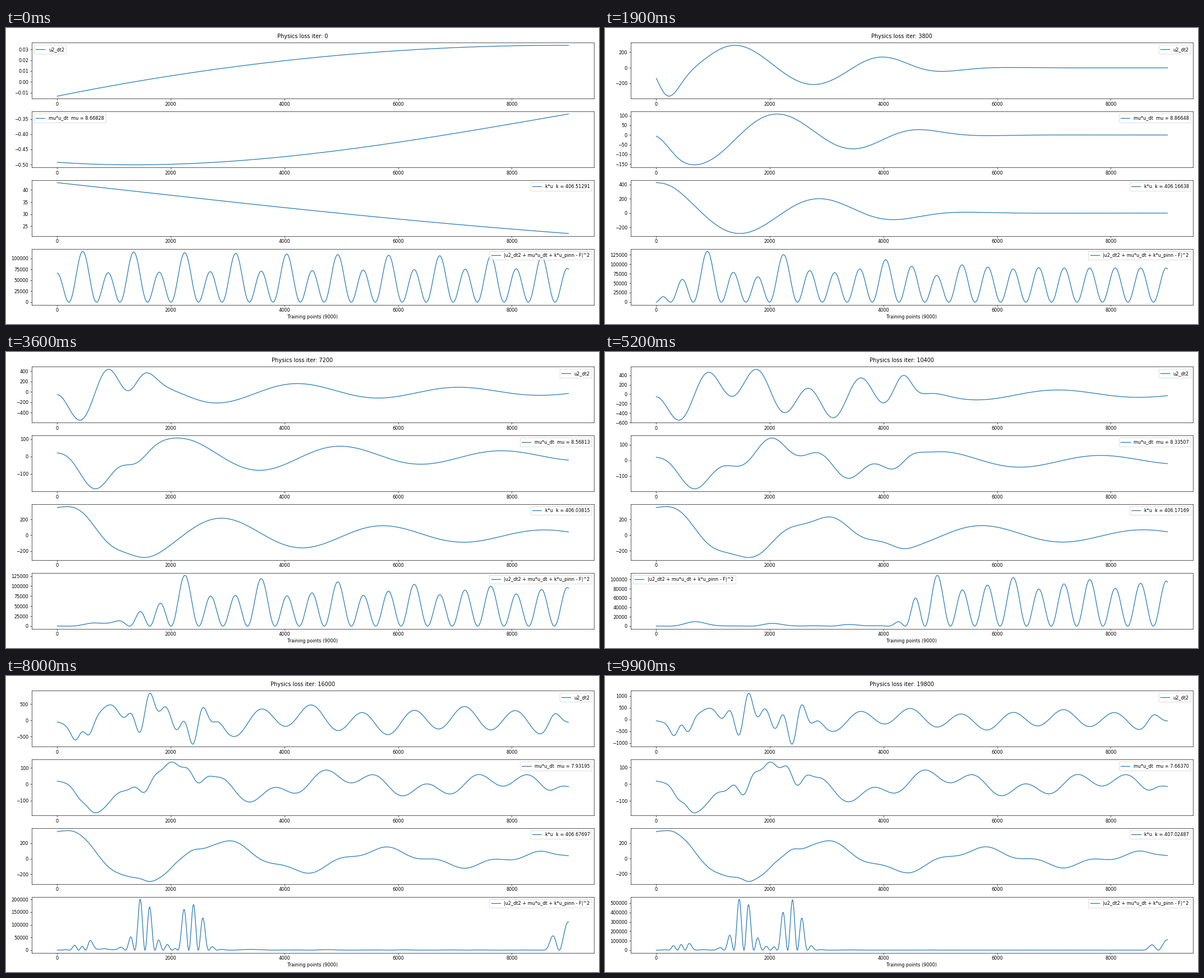
A matplotlib script for the animation above (10000 ms loop, 1058 by 529 pixels).

```python
import numpy as np
import matplotlib.pyplot as plt
from matplotlib.animation import FuncAnimation

WIDTH, HEIGHT = 1058, 529
FRAMES = 100
ITERS_PER_FRAME = 200
N = 9000

idx = np.arange(N, dtype=float)
t = idx / N

# Driven, damped oscillator: u'' + MU u' + K u = FORCE cos(OMEGA t)
FORCE, OMEGA = 300, 63
MU, K = 4, 400
drive = FORCE * np.cos(OMEGA * t)

# Learned coefficients at a few checkpoints
checkpoints = [0, 19, 36, 52, 68, 80, 99]
mu_path = [8.66828, 8.86648, 8.56813, 8.33507, 8.09911, 7.93195, 7.66370]
k_path = [406.51291, 406.16638, 406.03815, 406.17169, 406.45724, 406.67697,
          407.02487]

# Smooth guess of the untrained network
untrained = np.polynomial.polynomial.polyval(
    t, [.1058, -.0568, -.00655, .0158, -.0040])

# Free decay and steady response to the drive
free = .965 * np.exp(-1.85 * t) * np.cos(np.sqrt(K - MU ** 2 / 4) * t - .2)
stiff, drag = K - OMEGA ** 2, MU * OMEGA
forced = FORCE / (stiff ** 2 + drag ** 2) * (
    stiff * np.cos(OMEGA * t) + drag * np.sin(OMEGA * t))


def ease(p):
    p = np.clip(p, 0, 1)
    return p * p * (3 - 2 * p)


def learned_up_to(front, width):
    """One before the front, zero after it."""
    return (1 - np.tanh((idx - front) / width)) / 2


def burst(center, phase, period=410, width=300):
    """Wave packet with unit acceleration at its centre."""
    w = 2 * np.pi * N / period
    d = idx - center
    packet = np.cos(2 * np.pi * d / period + phase)
    return -packet * np.exp(-(d / width) ** 2) / w ** 2


# Late overfitting: two strong wave packets and a weak one near the start
overfit = (burst(1540, -np.pi / 2) + burst(2395, np.pi)
           + .35 * burst(440, 0, width=200))


def displacement(frame):
    """The slow decay is learned first, then the forced ripple follows it."""
    slow = learned_up_to(4400 * (frame / 19) ** 1.6, 1100)
    p = np.clip((frame - 19) / 49, 0, 1)
    front = 8750 * p ** 1.73
    ripple = learned_up_to(front, 450 - 250 * front / 8750)
    bias = .15 * (1 - ease((frame - 19) / 12)) * np.exp(-t / .04)
    u = free * slow + forced * ripple + bias
    u += 15 * max(0, frame - 52) * overfit
    grown = ease(frame / 14)
    return untrained + grown * (u - untrained)


def slope(y):
    return np.gradient(y, 1 / N, edge_order=2)


def tick_overhang(ax):
    """Pixels by which the top tick label sticks out of the axes."""
    lo, hi = ax.get_ylim()
    top = max(tick for tick in ax.get_yticks() if tick <= hi)
    return max(0, 4.1 - 100 * (hi - top) / (hi - lo))


def arrange():
    """Four equal rows with room for tick labels between them."""
    top, bottom = 26.4, 494.5
    gap = 22.8 + max(tick_overhang(ax) for ax in axes[1:])
    row = (bottom - top - 3 * gap) / 4
    fig.subplots_adjust(left=45.8 / WIDTH, right=1049.2 / WIDTH,
                        top=1 - top / HEIGHT, bottom=1 - bottom / HEIGHT,
                        hspace=gap / row)


fig, axes = plt.subplots(4, 1, figsize=(18, 9), dpi=WIDTH / 18)
title = fig.suptitle("Physics loss iter: 0", y=.982)
names = ["u2_dt2", "mu*u_dt", "k*u", "|u2_dt2 + mu*u_dt + k*u_pinn - F|^2"]
lines = [ax.plot(idx, np.zeros(N), label=name)[0]
         for ax, name in zip(axes, names)]
legends = [ax.legend(loc="best") for ax in axes]
axes[-1].set_xlabel("Training points (9000)")


def update(frame):
    mu = np.interp(frame, checkpoints, mu_path)
    k = np.interp(frame, checkpoints, k_path)
    u = displacement(frame)
    v = slope(u)
    terms = [slope(v), mu * v, k * u]
    loss = (sum(terms) - drive) ** 2
    for ax, line, y in zip(axes, lines, [*terms, loss]):
        line.set_ydata(y)
        ax.relim()
        ax.autoscale_view()
    legends[1].get_texts()[0].set_text(f"mu*u_dt  mu = {mu:.5f}")
    legends[2].get_texts()[0].set_text(f"k*u  k = {k:.5f}")
    title.set_text(f"Physics loss iter: {frame * ITERS_PER_FRAME}")
    arrange()
    return lines


anim = FuncAnimation(fig, update, frames=FRAMES, interval=100, repeat=True)
plt.show()
```
